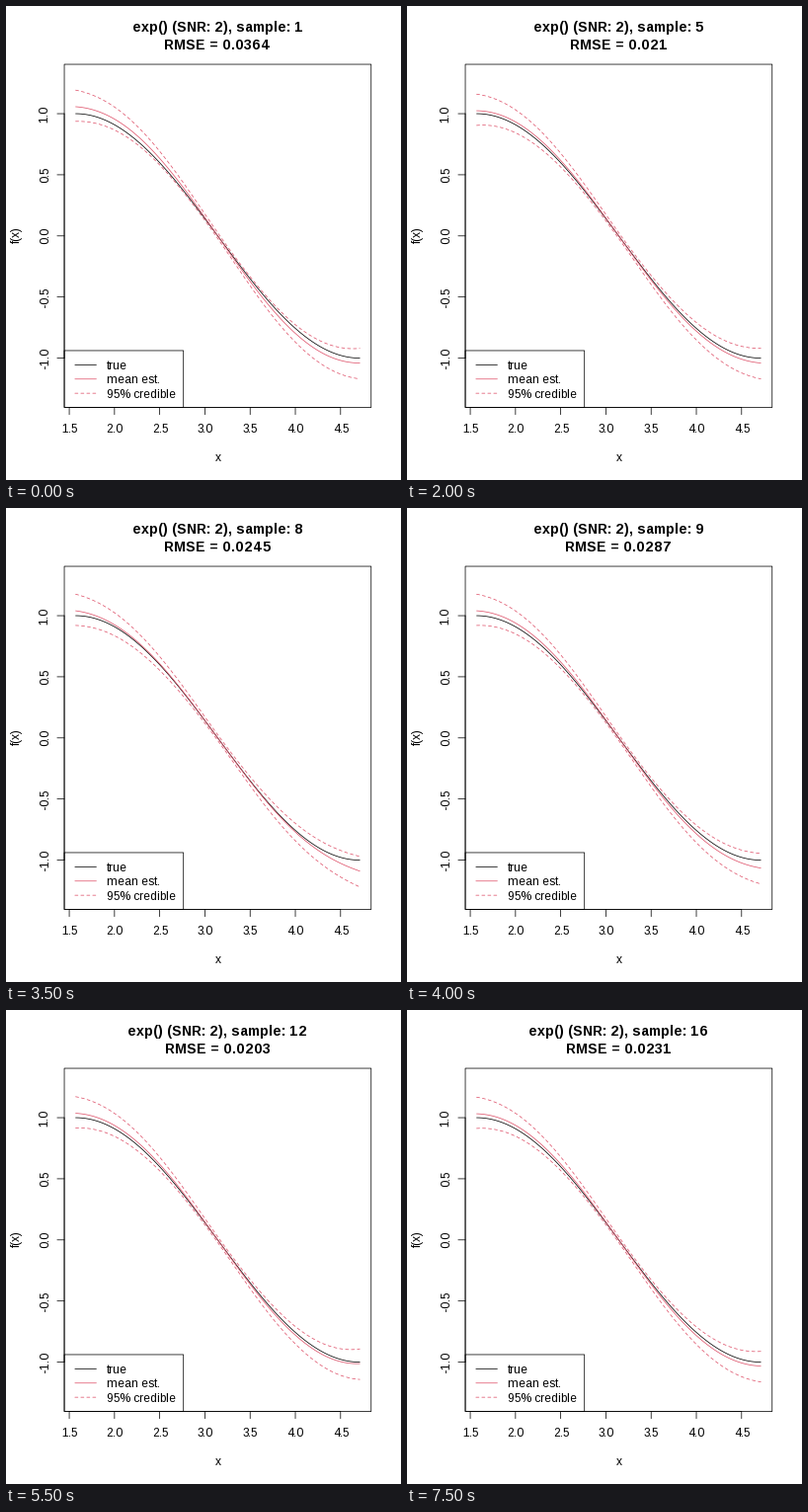
A matplotlib script that plays this animation: 400x480 px, repeating every 8 s.

```python
import matplotlib.pyplot as plt
import numpy as np
from matplotlib.animation import FuncAnimation
from matplotlib.patches import Rectangle

plt.rcParams.update({
    "font.family": "Liberation Sans",
    "text.hinting": "force_autohint",
    "text.hinting_factor": 1,
    "path.simplify": False,
})

W, H, LINE = 400, 480, 14.4
LEFT, RIGHT = 4.1 * LINE, W - 2.1 * LINE
TOP, BOTTOM = 4.1 * LINE, H - 5.1 * LINE
MID_X, MID_Y = (LEFT + RIGHT) / 2, (TOP + BOTTOM) / 2
SX = (RIGHT - LEFT) / 1.08 / np.pi
SY = (BOTTOM - TOP) / 1.08 / 2.6
RED = "#DF536B"
DASH = (0, (4, 4))
LW = 0.75

# Per sample: printed error, and the estimate's offset at either end of the range.
RMSE = [0.0364, 0.0318, 0.0431, 0.0254, 0.021, 0.0198, 0.0211, 0.0245,
        0.0287, 0.0252, 0.0292, 0.0203, 0.0216, 0.031, 0.0337, 0.0231]
START = [.057, .04, .016, .04, .024, .032, .04, .04,
         .04, .073, .049, .036, .04, .049, .049, .032]
END = [.04, .097, .077, .04, .04, .016, .012, .09,
       .065, .077, .057, .012, .008, .101, .097, .032]

xs = np.linspace(np.pi / 2, 1.5 * np.pi, 200)
u = (xs - np.pi) / (np.pi / 2)
true = np.sin(xs)
hump = u * (u * u - 1)
upper_gap = np.hypot(0.026, (0.125 - 0.008 * u) * u)
lower_gap = np.hypot(0.021, (0.123 + 0.005 * u) * u)


def px(x):
    return MID_X + (x - np.pi) * SX


def py(y):
    return MID_Y - y * SY


def estimate(rmse, start, end):
    """Mean curve with the given end offsets, its hump sized to give the RMSE."""
    tails = start * np.clip(-u, 0, 1) ** 5 - end * np.clip(u, 0, 1) ** 5
    a, b = np.mean(hump ** 2), np.mean(hump * tails)
    c = np.mean(tails ** 2) - rmse ** 2
    size = (np.sqrt(max(b * b - a * c, 0)) - b) / a
    return true + tails + size * hump


fig = plt.figure(figsize=(W / 72, H / 72), dpi=72, facecolor="white")
ax = fig.add_axes([0, 0, 1, 1])
ax.set_xlim(0, W)
ax.set_ylim(H, 0)
ax.axis("off")


def stroke(x, y, color="black", ls="-"):
    return ax.plot(x, y, color=color, ls=ls, lw=LW, snap=False,
                   solid_capstyle="round", dash_capstyle="round")[0]


def label(x, y, s, size=12, ha="center", **kw):
    return ax.text(x, y, s, fontsize=size, ha=ha, va="baseline",
                   rotation_mode="anchor", **kw)


def frame(x0, y0, x1, y1):
    ax.add_patch(Rectangle((x0, y0), x1 - x0, y1 - y0, fc="none", ec="black",
                           lw=LW, snap=False, zorder=3))


stroke(px(xs), py(true))
mean_line = stroke(px(xs), py(true), RED)
upper_line = stroke(px(xs), py(true), RED, DASH)
lower_line = stroke(px(xs), py(true), RED, DASH)

# Axes
frame(LEFT, TOP, RIGHT, BOTTOM)
for v in np.arange(1.5, 4.6, 0.5):
    stroke([px(v)] * 2, [BOTTOM, BOTTOM + 7.2])
    label(px(v), BOTTOM + 1.8 * LINE, f"{v:.1f}")
for v in np.arange(-1, 1.1, 0.5):
    stroke([LEFT - 7.2, LEFT], [py(v)] * 2)
    label(LEFT - 1.2 * LINE + 1, py(v), f"{v:.1f}", rotation=90)
label(MID_X, BOTTOM + 3.8 * LINE, "x")
label(LEFT - 3.2 * LINE + 1, MID_Y, "f(x)", rotation=90)

# Axis lines run between the outermost ticks
stroke(px(np.array([1.5, 4.5])), [BOTTOM] * 2)
stroke([LEFT] * 2, py(np.array([-1, 1])))

# Legend
legend_top = BOTTOM - 4 * LINE
frame(LEFT, legend_top, 179.7, BOTTOM)
entries = [("true", "black", "-"), ("mean est.", RED, "-"),
           ("95% credible", RED, DASH)]
for k, (name, color, ls) in enumerate(entries, 1):
    y = legend_top + k * LINE
    stroke([LEFT + 10.8, LEFT + 32.4], [y, y], color, ls)
    label(LEFT + 43.2, y + 4.4, name, ha="left")

title = label(MID_X, 26, "", LINE, weight="bold")
subtitle = label(MID_X, 44, "", LINE, weight="bold")


def update(i):
    mean = estimate(RMSE[i], START[i], END[i])
    mean_line.set_ydata(py(mean))
    upper_line.set_ydata(py(mean + upper_gap))
    lower_line.set_ydata(py(mean - lower_gap))
    title.set_text(f"exp() (SNR: 2), sample: {i + 1}")
    subtitle.set_text(f"RMSE = {RMSE[i]}")
    return mean_line, upper_line, lower_line, title, subtitle


anim = FuncAnimation(fig, update, frames=len(RMSE), interval=500,
                     repeat=True, repeat_delay=0)
plt.show()
```
